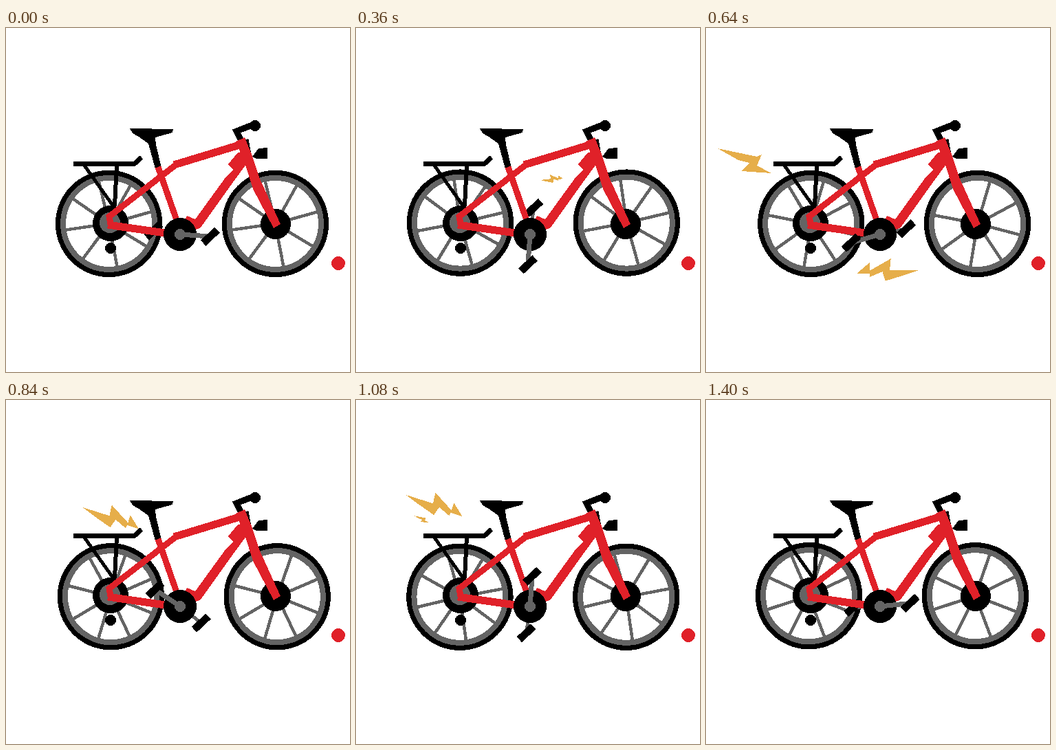
Write an HTML page that moves like this. It is 500x500 px and loops after 1.44 s.

```html
<!DOCTYPE html>
<html lang="en">
<head>
<meta charset="utf-8">
<title>Bicycle</title>
<style>
  html, body { margin: 0; width: 100%; height: 100%; overflow: hidden; background: #fff; }
  svg { display: block; width: 100vw; height: 100vh; }
  .red { fill: #e02129; }
  .grey { fill: #646464; }
  .bolt { fill: #e6ae4a; }
  .line { fill: none; stroke: #000; }
  .tube { fill: none; stroke: #e02129; }
  .steel { fill: none; stroke: #646464; }
</style>
</head>
<body>
<svg viewBox="0 0 500 500" shape-rendering="crispEdges">
  <defs>
    <g id="wheel">
      <circle r="73.8" class="line" stroke-width="7.8"/>
      <circle r="66.5" class="steel" stroke-width="8"/>
      <g id="spokes" class="steel" stroke-width="4.5"></g>
    </g>
    <rect id="pedal" x="-14" y="-5.5" width="28" height="11" transform="rotate(-43)"/>
    <path id="flash" d="M0 0L57 12L64 9L57 25L78 36L35 33L46 21L30 17Z"/>
    <path id="zigzag" d="M0 0L35 11L38 -3L59 20L62 10L73 28L58 23L56 27L43 16L36 26L16 12Z"/>
  </defs>

  <use id="rear" href="#wheel"/>
  <use id="front" href="#wheel"/>

  <!-- hubs, derailleur and rack -->
  <circle cx="152" cy="284" r="26"/>
  <circle class="grey" cx="151" cy="283" r="15"/>
  <circle cx="392" cy="285" r="22"/>
  <circle cx="152" cy="320" r="8"/>
  <path class="line" stroke-width="5" d="M114 200L156 259"/>
  <path class="line" stroke-width="6" d="M161 198L158 259"/>
  <path class="line" stroke-width="7" d="M98 197H187L197 188"/>

  <line id="farArm" class="steel" x1="253" y1="300" stroke-width="5"/>
  <use id="farPedal" href="#pedal"/>

  <!-- saddle, handlebar and lamp -->
  <path d="M180 146L243 147L242 152L217 159L218 170L226 203L217 205L207 168L193 158L184 153Z"/>
  <path class="line" stroke-width="9" d="M342 164L335 150L358 141M348 162L353 190"/>
  <circle cx="362" cy="142" r="8"/>
  <path d="M358 187L367 175L380 174V190H364Z"/>

  <!-- frame -->
  <path class="tube" stroke-width="9" d="M221 202L250 285M153 291L150 274L248 198"/>
  <path class="tube" stroke-width="11" d="M148 286L231 298M244 199L346 168"/>
  <path class="red" d="M336 182L352 176L357 186L350 197L330 224L283 290L272 295L259 280L263 273L275 278L320 216L330 206L323 198Z"/>
  <path class="red" d="M334 165L347 159L358 186L368 217L399 285L389 291L359 234L348 199Z"/>

  <circle cx="253" cy="300" r="24"/>
  <line id="nearArm" class="steel" x1="253" y1="300" stroke-width="7"/>
  <circle class="grey" cx="253" cy="300" r="8"/>
  <use id="nearPedal" href="#pedal"/>

  <g id="bolts" class="bolt"></g>
  <circle class="red" cx="483" cy="342" r="10"/>
</svg>

<script>
const LOOP = 1440, STEP = 40, SPOKES = 8, DRIFT = 0.16;
const $ = id => document.getElementById(id);
const rad = deg => deg * Math.PI / 180;
const place = (el, transform) => el.setAttribute('transform', transform);

function add(parent, tag, attrs) {
  const el = document.createElementNS('http://www.w3.org/2000/svg', tag);
  for (const k in attrs) el.setAttribute(k, attrs[k]);
  return parent.appendChild(el);
}

// Slightly uneven spokes, as drawn by hand
for (let i = 0; i < SPOKES; i++) {
  const a = i * 360 / SPOKES + 33 + 4 * Math.sin(i * 0.8 - 0.5);
  add($('spokes'), 'line', { x1: 18, x2: 64, transform: `rotate(${a})` });
}

// Position of the tip halfway through each bolt's life; all drift left
const bolts = [
  { shape: 'flash', mid: 200, life: 280, x: 28, y: 314, size: 1, turn: 5 },
  { shape: 'zigzag', mid: 370, life: 380, x: 266, y: 221, size: 0.43, turn: -24 },
  { shape: 'zigzag', mid: 560, life: 340, x: 322, y: 352, size: 1.15, turn: 18, flip: true },
  { shape: 'flash', mid: 640, life: 280, x: 17, y: 175, size: 1, turn: 0 },
  { shape: 'zigzag', mid: 960, life: 480, x: 92, y: 147, size: 1.12, turn: 0, rise: 0.075 },
  { shape: 'flash', mid: 1080, life: 160, x: 84, y: 168, size: 0.28, turn: 0 }
];
for (const b of bolts) b.el = add($('bolts'), 'use', { href: '#' + b.shape });

function drawBolt({ el, mid, life, x, y, size, turn, flip, rise = 0 }, t) {
  const dt = t - mid, p = Math.abs(dt) / life;
  const s = p < 0.5 ? size * Math.min(1, 1.5 * Math.cos(Math.PI * p)) : 0;
  place(el, `translate(${x - DRIFT * dt} ${y - rise * dt}) rotate(${turn}) scale(${flip ? -s : s} ${s})`);
}

// Wheels run a little off-centre
function drawWheel(id, cx, cy, turn) {
  const a = rad(turn + 190);
  place($(id), `translate(${cx + 1.6 * Math.cos(a)} ${cy + 1.6 * Math.sin(a)}) rotate(${turn})`);
}

function drawCrank(side, deg, len) {
  const x = 253 + len * Math.cos(rad(deg)), y = 300 + len * Math.sin(rad(deg));
  $(side + 'Arm').setAttribute('x2', x);
  $(side + 'Arm').setAttribute('y2', y);
  place($(side + 'Pedal'), `translate(${x} ${y})`);
}

function draw(t) {
  const turn = t / LOOP * 360;
  drawWheel('rear', 151.2, 284.7, turn);
  drawWheel('front', 393, 284.7, turn);
  drawCrank('near', turn + 4, 44);
  drawCrank('far', turn + 188, 39);
  for (const b of bolts) drawBolt(b, t);
}

const start = performance.now();
function tick() {
  const t = (performance.now() - start) % LOOP;
  draw(Math.floor(t / STEP) * STEP);
  requestAnimationFrame(tick);
}
tick();
</script>
</body>
</html>
```
